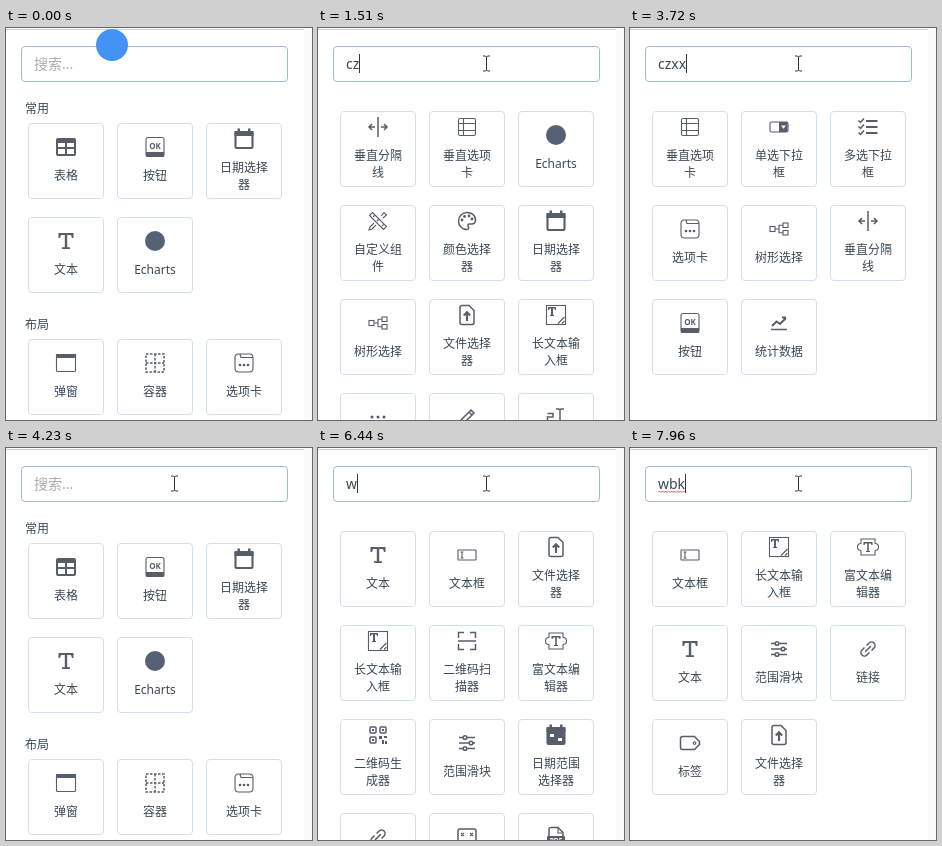
An HTML page that plays this animation: 306 px wide and 392 px high, repeating every 8000 ms.

```html
<!DOCTYPE html>
<html lang="zh-CN">
<head>
<meta charset="utf-8">
<title>组件搜索</title>
<style>
  html, body { margin: 0; width: 100%; height: 100%; overflow: hidden; background: #fff; }
  svg { display: block; width: 306px; height: 392px; }
  text { font-family: "Noto Sans", "Noto Sans CJK SC", "Noto Sans CJK", sans-serif; fill: #3a4856; }
  .label { font-size: 12px; text-anchor: middle; }
  .head { font-size: 12px; }
  .field { font-size: 14px; white-space: pre; }
  .hint { fill: #adada8; }
  .card { fill: #fff; stroke: #d3dfeb; }
  .icon { fill: none; stroke: #575d69; stroke-width: 1.5; }
  .icon .solid { fill: #575d69; stroke: none; fill-rule: evenodd; }
  .icon .thin { stroke-width: 1.1; }
  .icon .bold { stroke-width: 2.1; }
  .icon text { fill: #575d69; stroke: none; text-anchor: middle; font-weight: 700; }
</style>
</head>
<body>
<svg id="stage" viewBox="0 0 306 392">
  <rect width="306" height="392" fill="#fff"/>
  <rect x="298" width="8" height="392" fill="#fafafb"/>
  <rect y="1" width="298" height="1" fill="#d2d2d2"/>
  <g id="lists"></g>
  <rect x="15.5" y="18.5" width="266" height="35" rx="3.5" fill="#fff" stroke="#9fb9da"/>
  <text id="hint" class="field hint" x="28" y="41">搜索...</text>
  <text id="typed" class="field" x="28" y="41"></text>
  <path id="wave" fill="none" stroke="#e0554f" stroke-width="1"/>
  <rect id="caret" width="1" height="19" fill="#2f3a45"/>
  <circle id="badge" cx="106" cy="17" r="16" fill="#4592f7"/>
  <path id="arrow" d="M.5.5v16l3.7-3.5 2.5 5.5 2.3-1-2.5-5.4h5z" fill="#fff" stroke="#111"/>
  <path id="beam" d="M-3.5-7.5h2.5l1 1 1-1h2.5M0-6.5v13M-3.5 7.5h2.5l1-1 1 1h2.5" fill="none" stroke="#333"/>
</svg>
<script>
const $ = id => document.getElementById(id);

// Icon parts, drawn around 0,0
const line = (d, cls = '') => `<path class="${cls}" d="${d}"/>`;
const solid = d => line(d, 'solid');
const box = (x, y, w, h, r = 0, cls = '') =>
  `<rect class="${cls}" x="${x}" y="${y}" width="${w}" height="${h}" rx="${r}"/>`;
const dots = (y, gap, r) => [-gap, 0, gap].map(x => `<circle class="solid" cx="${x}" cy="${y}" r="${r}"/>`).join('');
const word = (s, x, y, size) => `<text x="${x}" y="${y}" font-size="${size}">${s}</text>`;
const calendar = box(-8.5, -7, 17, 16, 1, 'bold') + solid('M-9.5-8H9.5V-3H-9.5zM-6.5-10.5h2.5v3h-2.5zM4-10.5h2.5v3H4z');
const file = line('M-7-7.5a2 2 0 0 1 2-2H2L7-4.5V7.500a2 2 0 0 1-2 2H-5a2 2 0 0 1-2-2z');
const smallT = 'M-8-8H0v3H-1l-.6-1.500h-1.400V0h1v1h-4V0h1v-6.500h-1.400L-7-5h-1z';

const icons = {
  table: solid('M-10-7a2 2 0 0 1 2-2H8a2 2 0 0 1 2 2V7a2 2 0 0 1-2 2H-8a2 2 0 0 1-2-2zM-8-4V0H-1V-4zM1-4V0H8V-4zM-8 2V7H-1V2zM1 2V7H8V2z'),
  button: box(-9, -9.5, 18, 19, 2, 'thin') + solid('M-9 5H9V8a2 2 0 0 1-2 2H-7a2 2 0 0 1-2-2z') + word('OK', 0, 1.5, 8),
  calendar,
  range: calendar + solid('M-9-4H9V9H-9zM-6-1v3h4v-3zM2 3v3h4V3z'),
  text: solid('M-7.500-8H7.500v5H6L5-6H1.200V6.300H4V8H-4V6.300h2.800V-6H-5L-6-3h-1.500z'),
  chart: '<circle r="10" fill="#566273" stroke="none"/>',
  modal: box(-9.5, -8.5, 19, 17, 1, 'thin') + solid('M-10-9H10v4H-10z'),
  grid: '<g stroke-dasharray="2.500 1.500">' + line('M-9-9H9V9H-9zM0-9V9M-9 0H9') + '</g>',
  tabs: box(-9, -9, 18, 18, 3.5, 'thin') + line('M-4-9l1 3.500H9', 'thin') + dots(2, 4, 1.3),
  split: line('M0-10V10M-3 0H-9M-6-3l-3 3 3 3M3 0H9M6-3l3 3-3 3'),
  sideTabs: box(-8.5, -8.5, 17, 17, 1.5, 'thin') + line('M-3.500-8.500v17M-8.500-3.500h17M-8.500 3.500h17', 'thin'),
  custom: line('M-8.500-5.500l3-3 14 14-3 3zM-3-6l-2 2M1-2l-2 2M6 3l-2 2M3-5l3-3.500 2.500 2.500-3.500 3M-2 4l-4 4-3 1 1-3 4-4', 'thin'),
  palette: line('M0-8.500c5 0 8.500 3 8.500 7.500 0 3-2 4-4 4H2.500c-2 0-2 1.500-1.200 2.500 1 1.500 0 3-1.300 3a8.500 8.500 0 0 1 0-17z')
    + [[-5, -1], [-2.5, -4.5], [2, -5], [5, -2]].map(([x, y]) => `<circle class="solid" cx="${x}" cy="${y}" r="1.400"/>`).join(''),
  tree: box(-9, -2.5, 5, 5, 0, 'thin') + box(4, -6, 5, 4.5, 0, 'thin') + box(4, 1.5, 5, 4.5, 0, 'thin')
    + line('M-4 0H0M4-3.700H0V3.700H4', 'thin'),
  file: file + line('M0 6V-2.500M-3.200.5L0-2.700 3.200.5', 'bold'),
  area: box(-9.5, -9.5, 19, 19, 0, 'thin') + solid(smallT) + line('M2 8.500L8.500 2M6 8.500L8.500 6', 'thin'),
  more: dots(0, 6, 1.5),
  pen: line('M-7.500 7.500l1-4L4-7l3 3L-3.500 6.500zM2-5l3 3'),
  number: line('M-8.500-3.500h5.500V0h-5.500v4.500h5.500') + line('M0-8h3l1 1 1-1h3M4-7V7M0 8h3l1-1 1 1h3'),
  check: box(-9, -9, 18, 18, 1) + line('M-4.500 0l3.500 3.500L5-3.500', 'bold'),
  select: box(-9, -5, 18, 10, 1.5, 'thin') + solid('M0-5H8.500V5H0zM2-1.500H7L4.500 1.700z'),
  multi: line('M-2-6H9.500M-2 0H9.500M-2 6H9.500', 'bold') + line('M-9.500-6.500l2 2 3.500-4M-9.500-.5l2 2 3.500-4M-9.500 5.500l2 2 3.500-4'),
  stats: line('M-7 3l4.500-4.500L1 1l6-6M3-5.500h4', 'bold') + line('M-8 6.500H8'),
  input: box(-9, -5, 18, 10, 0.5, 'thin') + line('M-6.500-3h3M-5-3v6M-6.500 3h3', 'thin'),
  scan: line('M-8.500-3V-8.500H-3M3-8.500H8.500V-3M8.500 3V8.500H3M-3 8.500H-8.500V3M-9 0H9'),
  rich: line('M-7-3.500V-8H7v4.500M-7 3.500V8H7V3.500', 'thin') + line('M-7-3.500a3.500 3.500 0 0 0 0 7M7-3.500a3.500 3.500 0 0 1 0 7', 'thin')
    + solid('M-4.500-5h9v3H3.500l-.6-1.500H.8V4H2v1H-2V4h1.200v-7.500h-2L-3.500-2h-1z'),
  code: [[-8, -8], [2, -8], [-8, 2]].map(([x, y]) => box(x, y, 6, 6, 1) + box(x + 2, y + 2, 2, 2, 0, 'solid')).join('')
    + solid('M1 1h3v3H1zM6 1h3v2H6zM4 5h2v4H4zM7 6h2v3H7z'),
  sliders: line('M-8-5.500H8M-8 0H8M-8 5.500H8') + [[-2, -5.5], [4, 0], [-2, 5.5]].map(([x, y]) =>
    `<circle cx="${x}" cy="${y}" r="1.800" fill="#fff"/>`).join(''),
  link: '<g transform="rotate(-45)">' + line('M-1.500-3.500H-5a3.500 3.500 0 0 0 0 7H-1.500M1.500-3.500H5a3.500 3.500 0 0 1 0 7H1.500M-4 0H4') + '</g>',
  calc: box(-9, -8, 18, 17, 2) + line('M-6-4l3 3M-3-4l-3 3M3-4l3 3M6-4l-3 3M-6 4h3M3 4h3', 'thin'),
  pdf: file + line('M2-9.500V-4H7', 'thin') + box(-9, -1, 18, 8, 1, 'solid') + '<text style="fill:#fff" y="5.500" font-size="6.500">PDF</text>',
  tag: line('M-9.500-4.500a2 2 0 0 1 2-2H4.500L9.500-1.500V1.500L4.500 6.500H-7.500a2 2 0 0 1-2-2z') + '<circle class="thin" cx="4.500" r="1.300"/>'
};

const widgets = {
  表格: 'table', 按钮: 'button', 日期选择器: 'calendar', 文本: 'text', Echarts: 'chart',
  弹窗: 'modal', 容器: 'grid', 选项卡: 'tabs', 垂直分隔线: 'split', 垂直选项卡: 'sideTabs',
  自定义组件: 'custom', 颜色选择器: 'palette', 树形选择: 'tree', 文件选择器: 'file',
  长文本输入框: 'area', 步骤: 'more', 签名: 'pen', 数字框: 'number', 复选框: 'check',
  单选下拉框: 'select', 多选下拉框: 'multi', 统计数据: 'stats', 文本框: 'input',
  二维码扫描器: 'scan', 富文本编辑器: 'rich', 二维码生成器: 'code', 范围滑块: 'sliders',
  日期范围选择器: 'range', 链接: 'link', 计算器: 'calc', 文档: 'pdf', 标签: 'tag'
};

const results = {
  c: '垂直分隔线 垂直选项卡 Echarts 长文本输入框 选项卡 日期选择器 文件选择器 颜色选择器 树形选择 自定义组件 复选框 数字框',
  cz: '垂直分隔线 垂直选项卡 Echarts 自定义组件 颜色选择器 日期选择器 树形选择 文件选择器 长文本输入框 步骤 签名 数字框',
  czx: '垂直选项卡 单选下拉框 多选下拉框 选项卡 树形选择 垂直分隔线',
  czxx: '垂直选项卡 单选下拉框 多选下拉框 选项卡 树形选择 垂直分隔线 按钮 统计数据',
  czxxk: '垂直选项卡 选项卡 复选框 单选下拉框 多选下拉框 数字框 垂直分隔线 树形选择',
  w: '文本 文本框 文件选择器 长文本输入框 二维码扫描器 富文本编辑器 二维码生成器 范围滑块 日期范围选择器 链接 计算器 文档',
  wb: '文本框 文本 长文本输入框 富文本编辑器 文件选择器 范围滑块 二维码扫描器 二维码生成器 链接 日期范围选择器 标签 文档',
  wbk: '文本框 长文本输入框 富文本编辑器 文本 范围滑块 链接 标签 文件选择器'
};

function card(name, x, y) {
  const two = name.length > 4 && name !== 'Echarts';
  const rows = two ? [name.slice(0, 4), name.slice(4)] : [name];
  const labels = rows.map((s, i) =>
    `<text class="label" x="38" y="${two ? 49 + 17 * i : 57}">${s}</text>`).join('');
  return `<g transform="translate(${x} ${y})"><rect class="card" x=".5" y=".5" width="75" height="75" rx="3.500"/>`
    + `<g class="icon" transform="translate(38 ${two ? 16 : 24})">${icons[widgets[name]]}</g>${labels}</g>`;
}

const cards = (names, top) => names.split(' ').map((n, i) =>
  card(n, 22 + 89 * (i % 3), top + 94 * Math.floor(i / 3))).join('');
const head = (s, y) => `<text class="head" x="19" y="${y}">${s}</text>`;

const layers = {};
function addLayer(key, markup) {
  const g = document.createElementNS('http://www.w3.org/2000/svg', 'g');
  g.innerHTML = markup;
  $('lists').append(g);
  layers[key] = g;
}
addLayer('', head('常用', 85) + cards('表格 按钮 日期选择器 文本 Echarts', 95)
  + head('布局', 301) + cards('弹窗 容器 选项卡', 311));
for (const key in results) addLayer(key, cards(results[key], 83));

// time, typed text, caret, spelling mark
const steps = [
  [0, '', 0], [700, '', 1],
  [1100, 'c', 1], [1510, 'cz', 1], [2010, 'czx', 1], [2210, 'czxx', 1], [2410, 'czxxk', 1],
  [2910, 'czxxk', 0], [3420, 'czxxk', 1, 1], [3720, 'czxx', 1], [4030, 'czxx', 0],
  [4230, '', 0], [4530, '', 1], [5030, '', 0], [5530, '', 1], [6140, '', 0],
  [6440, 'w', 1], [6640, 'wb', 1], [6940, 'wbk', 1], [7460, 'wbk', 0], [7960, 'wbk', 1, 1]
];
const LOOP = 8000;
const show = (el, on) => el.style.display = on ? '' : 'none';

function pointer(t) {
  const k = Math.min(1, Math.max(0, (Math.floor(t / 100) - 1) / 5));
  const ease = k * (2 - k);
  const x = Math.round(275 - 107 * k);
  const y = Math.round(233 - 198 * ease);
  const inField = y < 54;
  show($('arrow'), t >= 100 && !inField);
  show($('beam'), t >= 100 && inField);
  $('arrow').setAttribute('transform', `translate(${x} ${y})`);
  $('beam').setAttribute('transform', `translate(${x + 0.5} ${y + 0.5})`);
}

function draw(t) {
  const [, text, caret, mark] = steps.findLast(s => s[0] <= t);
  for (const key in layers) show(layers[key], key === text);
  show($('hint'), !text);
  $('typed').textContent = text;
  const width = text ? Math.floor($('typed').getComputedTextLength()) : 0;
  $('caret').setAttribute('x', 28 + width);
  $('caret').setAttribute('y', text ? 26 : 27);
  show($('caret'), caret);
  show($('wave'), mark);
  $('wave').setAttribute('d', 'M28 44.500' + 'l1.500-1.500 1.500 1.500'.repeat(Math.floor(width / 3)));
  show($('badge'), t < 100);
  pointer(t);
}

const start = performance.now();
function tick() {
  draw((performance.now() - start) % LOOP);
  requestAnimationFrame(tick);
}
tick();
</script>
</body>
</html>
```
